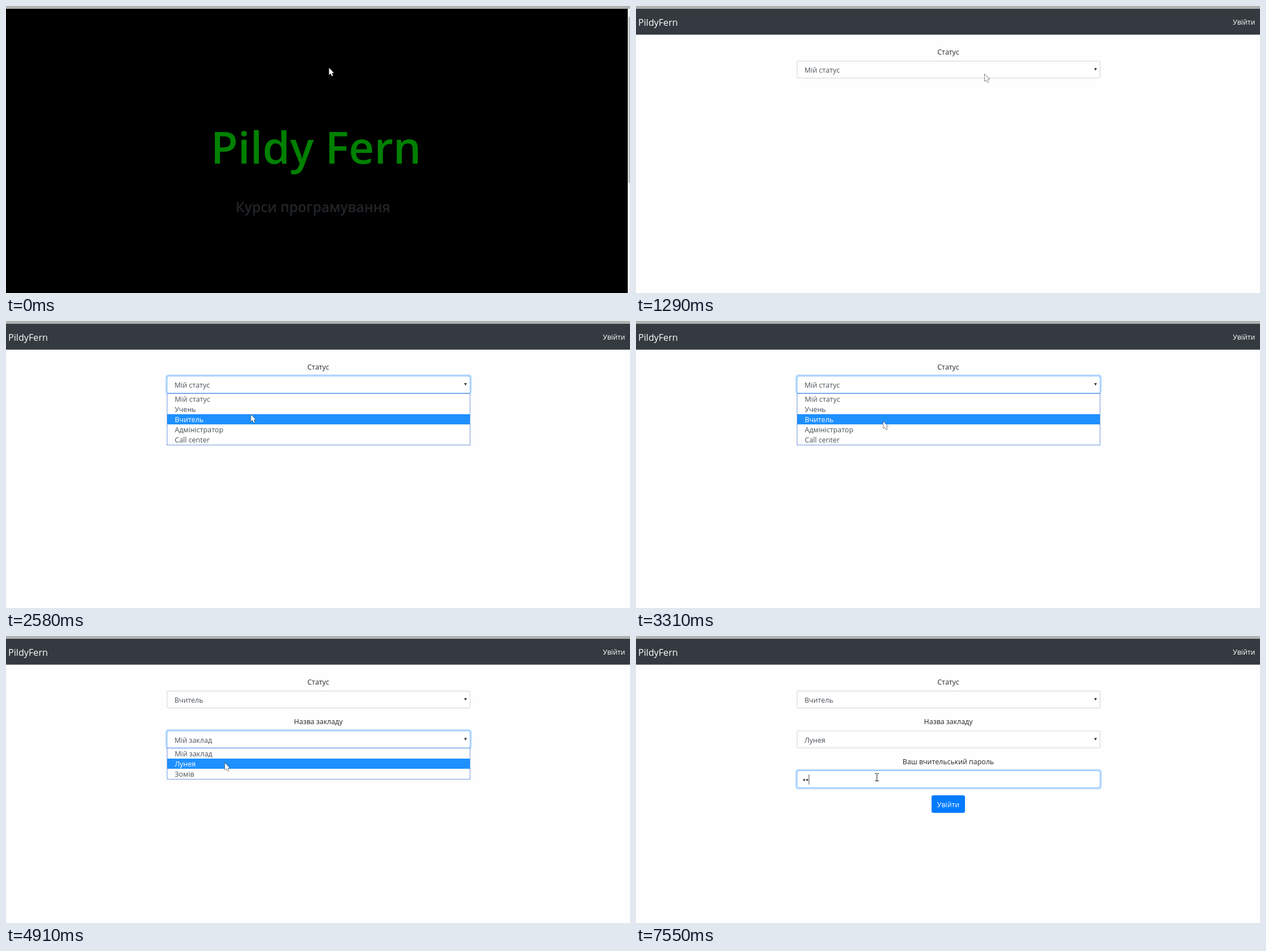
An HTML page with a canvas for the animation above (7.99 s loop, 1102 by 508 pixels).

```html
<!DOCTYPE html>
<html lang="uk">
<head>
<meta charset="utf-8">
<title>PildyFern</title>
<style>
  html, body { margin: 0; width: 100%; height: 100%; overflow: hidden; background: #fefefe; }
  canvas { display: block; width: 1102px; height: 508px; }
</style>
</head>
<body>
<canvas id="stage" width="1102" height="508"></canvas>
<script>
const ctx = document.getElementById('stage').getContext('2d');
const W = 1102, H = 508, LOOP = 7990;
const FONT = '"Open Sans", "Noto Sans", sans-serif';
const INK = '#212529', FIELD_INK = '#495057', BLUE = '#007bff', PAPER = '#fefefe';
const BOX = { x: 284, w: 536, h: 31 };
const ROW = 18;
const STATUS = ['Мій статус', 'Учень', 'Вчитель', 'Адміністратор', 'Call center'];
const PLACES = ['Мій заклад', 'Лунея', 'Зомів'];

const BEAT = 145.3, LEAD = 33;
const AT = {
  light: 1, hover: 5, form: 7, openStatus: 14, pickStatus: 26,
  openPlace: 30, pickPlace: 42, beam: 44, focus: 46, blink: 49, type: 51, erase: 52
};

// Pointer strokes: each eases to its target between two beats
const START = { x: 570, y: 109 };
const STROKES = [
  { from: 0, to: 2, x: 1039, y: 34 },
  { from: 2, to: 3, x: 1087, y: 45 },
  { from: 4, to: 5, x: 1065, y: 27 },
  { from: 8, to: 9, x: 615, y: 120 },
  { from: 10, to: 15, x: 421, y: 126 },
  { from: 15, to: 21, x: 441, y: 197 },
  { from: 21, to: 23, x: 436, y: 177 },
  { from: 26, to: 31, x: 390, y: 186 },
  { from: 32, to: 36, x: 384, y: 237 },
  { from: 38, to: 39, x: 382, y: 229 },
  { from: 42, to: 46, x: 425, y: 250 }
];

const easeOut = p => 1 - (1 - p) ** 2;

function pointerAt(beat) {
  let { x, y } = START;
  for (const s of STROKES) {
    if (beat <= s.from) break;
    const p = easeOut(Math.min(1, (beat - s.from) / (s.to - s.from)));
    x += (s.x - x) * p;
    y += (s.y - y) * p;
  }
  return { x: Math.round(x), y: Math.round(y) };
}

function rect(x, y, w, h, color) {
  ctx.fillStyle = color;
  ctx.fillRect(x, y, w, h);
}

function round(x, y, w, h, r, color) {
  ctx.fillStyle = color;
  ctx.beginPath();
  ctx.roundRect(x, y, w, h, r);
  ctx.fill();
}

function text(str, x, y, size, color, align = 'left', weight = 400) {
  ctx.font = `${weight} ${size}px ${FONT}`;
  ctx.textAlign = align;
  ctx.fillStyle = color;
  ctx.fillText(str, x, y);
}

function poly(points, fill, stroke) {
  ctx.beginPath();
  points.forEach(([x, y]) => ctx.lineTo(x, y));
  ctx.closePath();
  if (stroke) {
    ctx.lineWidth = 1;
    ctx.strokeStyle = stroke;
    ctx.stroke();
  }
  ctx.fillStyle = fill;
  ctx.fill();
}

function arrow({ x, y }) {
  ctx.save();
  ctx.translate(x + 0.5, y + 0.5);
  ctx.scale(0.92, 0.92);
  poly([[0, 0], [0, 13.6], [3.1, 10.8], [5.4, 16], [7.6, 15], [5.4, 10.1], [9.4, 9.7]], '#fff', '#000');
  ctx.restore();
}

function beam({ x, y }) {
  rect(x, y - 6, 1, 13, '#222');
  for (const edge of [y - 7, y + 6]) {
    rect(x - 3, edge, 3, 1, '#222');
    rect(x + 1, edge, 3, 1, '#222');
  }
}

function navbar(width, linkX, linkColor) {
  rect(0, 5, width, 45.7, '#343a40');
  text('PildyFern', 4, 34.5, 16.2, '#fff');
  text('Увійти', linkX, 33, 12.4, linkColor);
}

function scrollbar(bottom) {
  rect(1098, 5, 4, H - 5, '#f1f1f1');
  rect(1099, 19, 3, bottom - 19, '#c1c1c1');
}

function landing(beat) {
  const dark = beat < AT.light;
  rect(0, 5, W, H - 5, dark ? '#000' : PAPER);
  if (!dark) navbar(1098, 1040, beat < AT.hover ? '#999c9f' : '#ccced0');
  text('Pildy Fern', dark ? 547.5 : 545.5, 279, 78, '#008000', 'center', 600);
  text('Курси програмування', dark ? 542 : 544.5, 365, 24.5, INK, 'center', 600);
  scrollbar(dark ? 313 : 148);
}

function field(label, y, focused) {
  const { x, w, h } = BOX;
  text(label, 551.5, y - 11.5, 12.4, INK, 'center');
  if (focused) round(x - 2.6, y - 2.6, w + 5.2, h + 5.2, 5.5, '#bfdeff');
  round(x, y, w, h, 3.3, focused ? '#80bdff' : '#ced4da');
  round(x + 1, y + 1, w - 2, h - 2, 2.5, '#fff');
}

function select(label, y, value, focused) {
  field(label, y, focused);
  text(value, 297.5, y + 21, 12.5, FIELD_INK);
  poly([[809, y + 13], [814, y + 13], [811.5, y + 17.5]], '#333');
}

function list(items, top, pointerY) {
  const active = Math.max(0, Math.floor((pointerY - top) / ROW));
  const height = items.length * ROW;
  rect(BOX.x, top - 1, BOX.w, height + 2, '#7398dc');
  rect(BOX.x + 1, top, BOX.w - 2, height, '#fff');
  items.forEach((item, i) => {
    const y = top + i * ROW;
    if (i === active) rect(BOX.x + 1, y, BOX.w - 2, ROW, '#1e90ff');
    text(item, 298, y + 14, 12.5, i === active ? '#fff' : FIELD_INK);
  });
}

function password(beat) {
  const focused = beat >= AT.focus;
  const count = beat < AT.type ? 0 : beat < AT.erase ? 10 : 2;
  const pitch = 5.3;
  field('Ваш вчительський пароль', 238, focused);
  for (let i = 0; i < count; i++) round(295.1 + i * pitch, 252.8, 3.8, 3.8, 1.9, FIELD_INK);
  const blinkOff = beat >= AT.blink && beat < AT.type;
  if (focused && !blinkOff) rect(Math.floor(294.4 + count * pitch), 245, 1, 18, FIELD_INK);
  round(522, 282, 59, 31, 3.3, BLUE);
  text('Увійти', 551.5, 303, 12.4, '#fff', 'center');
}

function form(beat, pointer) {
  const between = (a, b) => beat >= a && beat < b;
  const chosen = beat >= AT.pickStatus, placed = beat >= AT.pickPlace;
  rect(0, 5, W, H - 5, PAPER);
  navbar(W, 1054, '#fff');
  select('Статус', 97, STATUS[chosen ? 2 : 0], between(AT.openStatus, AT.openPlace));
  if (chosen) select('Назва закладу', 167.5, PLACES[placed ? 1 : 0], between(AT.openPlace, AT.focus));
  if (placed) password(beat);
  if (between(AT.openStatus, AT.pickStatus)) list(STATUS, 129, pointer.y);
  if (between(AT.openPlace, AT.pickPlace)) list(PLACES, 199, pointer.y);
}

function draw(time) {
  const beat = Math.floor((time % LOOP + LEAD) / BEAT);
  const pointer = pointerAt(beat);
  if (beat < AT.form) landing(beat);
  else form(beat, pointer);
  rect(0, 0, W, 5, '#b0b2b0');
  if (beat >= AT.beam) beam(pointer);
  else arrow(pointer);
}

let start;
function frame(now) {
  start ??= now;
  draw(now - start);
  requestAnimationFrame(frame);
}
requestAnimationFrame(frame);
</script>
</body>
</html>
```
